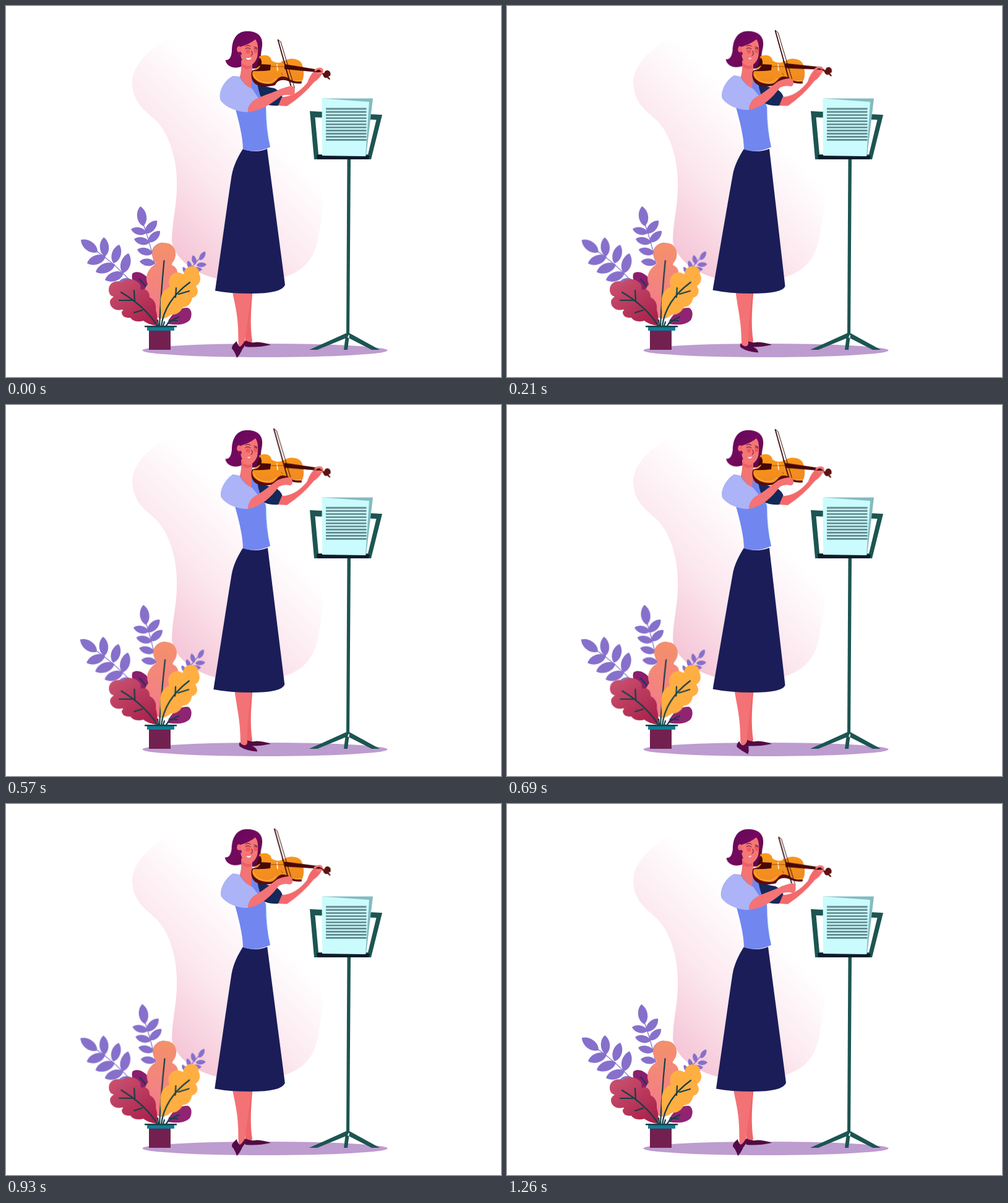
Animation, 800 px wide and 600 px high, one loop 1.29 s. Source, as an HTML page:

```html
<!DOCTYPE html>
<html lang="en">
<head>
<meta charset="utf-8">
<title>Violinist</title>
<style>
html, body { margin: 0; width: 100%; height: 100%; overflow: hidden; background: #fff; }
svg { display: block; width: 800px; height: 600px; }
svg * { animation-duration: 1290ms; animation-iteration-count: infinite; animation-timing-function: ease-in-out; }

/* plant */
.sway { animation-name: sway; transform-origin: 246px 517px; }
@keyframes sway { 50% { transform: rotate(var(--a)); } }
.vein { fill: none; stroke: #143f47; stroke-width: 2.2; stroke-linecap: round; }
.twig { fill: none; stroke: #8670cb; stroke-width: 1.3; }
.leaves { fill: #8670cb; }

/* right arm and bow */
.bow { animation-name: bow; }
@keyframes bow {
  16.3%, 32.6% { transform: translate(-6px, -15px); }
  44.2% { transform: translate(-6.7px, -16.3px); }
  62.8% { transform: translate(-5.5px, -14px); }
  81.4% { transform: translate(-6px, -15px); animation-timing-function: cubic-bezier(.4, .1, .7, .9); }
}
.arm { animation-name: arm; }
@keyframes arm {
  0%, 100% { d: path("M391 171.500C390 160 400 152 409 148C423 142 435 139 444 134Q452 131 461 129Q467 130 467 137Q467 144 462 145Q453 142 444 146C430 157 414 169 391 171.500Z"); }
  16.3%, 81.4% { d: path("M391 168C391 158 397 150 405 146C417 139 427 130 438 122Q446 118 456 117Q463 117 463 124Q463 130 458 130Q449 128 441 132C430 147 414 164 391 168Z"); animation-timing-function: cubic-bezier(.4, .1, .7, .9); }
}
.sleeve { animation-name: sleeve; }
@keyframes sleeve {
  0%, 100% { d: path("M367 113C350 121 342 143 347 153C356 165 376 172 391 171.500C390 160 400 152 408 149L398 134Q385 129 377 114Z"); }
  16.3%, 81.4% { d: path("M367 112C352 121 344 141 348 150C357 162 376 169 391 168C391 158 397 150 407 145L398 134Q385 129 377 114Z"); animation-timing-function: cubic-bezier(.4, .1, .7, .9); }
}

/* violin neck with the left hand */
.neck { animation-name: neck; transform-origin: 425px 97px; }
.hand { animation-name: hand; transform-origin: 443px 160px; }
@keyframes neck {
  16.3%, 81.4% { transform: rotate(-3.200deg); }
  32.6% { transform: rotate(-1.500deg); }
  44.2% { transform: rotate(-1deg); }
  62.8%, 97.7% { transform: rotate(-.6deg); }
}
@keyframes hand {
  16.3%, 81.4% { transform: rotate(-1.800deg); }
  32.6%, 44.2%, 97.7% { transform: rotate(-.4deg); }
  62.8% { transform: rotate(-.2deg); }
}

/* head */
.hair { animation-name: hair; transform-origin: 392px 60px; }
@keyframes hair {
  16.3%, 81.4% { transform: rotate(2deg); }
  32.6%, 44.2%, 97.7% { transform: rotate(.4deg); }
  62.8% { transform: rotate(1.200deg); }
}
.mouth { animation-name: mouth; transform-origin: 393px 84px; }
@keyframes mouth {
  0%, 62.8%, 100% { transform: none; }
  16.3%, 44.2%, 97.7% { transform: scale(.6, .65); }
  81.4% { transform: scale(.75, .8); }
}

/* skirt and tapping foot */
.skirt { animation-name: skirt; }
@keyframes skirt {
  0%, 33.300%, 77.500%, 100% { d: path("M383 231Q403 239 422 231L451 451Q446 465 396 465Q362 465 338 460.500C347 400 357 325 364.500 275C368 256 376 242 383 231Z"); }
  16.7%, 55.800% { d: path("M383 231Q403 239 424 231L449.500 453Q446 465 396 465Q360 465 332.500 459.500C343 400 355 328 364.500 275C367 258 376 242 383 231Z"); }
}
.leg { animation-name: leg; }
@keyframes leg {
  0%, 62.8%, 100% { d: path("M366 462C370 485 376 500 375.500 543Q376 553 381 552L386 543C388 520 394 490 397 462Z"); }
  16.3%, 44.2% { d: path("M369.500 462C373 490 379 510 379 546Q384 553 389 551L390 546C389 520 393 490 397 462Z"); }
}
.shoe { animation-name: shoe; }
@keyframes shoe {
  0%, 62.8%, 100% { d: path("M373 542Q364 549 365 554Q370 559 373 569Q377 566 382 555Q389 547 386 541Q382 549 378 551Q374 549 373 542Z"); }
  16.3%, 44.2% { d: path("M378 545Q375 550 379 553Q388 559 406 560.500Q406 555 399 552Q393 549 390 547Q388 551 384 550Q380 549 378 545Z"); }
}
</style>
</head>
<body>
<svg viewBox="0 0 800 600">
  <defs>
    <linearGradient id="glow" gradientUnits="userSpaceOnUse" x1="276" y1="402" x2="448" y2="230">
      <stop stop-color="#f5c6d7"/><stop offset=".5" stop-color="#fce8ef"/><stop offset="1" stop-color="#fff"/>
    </linearGradient>
    <linearGradient id="peach" x2="0" y2="1"><stop stop-color="#f4916a"/><stop offset="1" stop-color="#f27a8e"/></linearGradient>
    <linearGradient id="wine" x2=".8" y2="1"><stop stop-color="#cc5471"/><stop offset="1" stop-color="#a9214b"/></linearGradient>
    <linearGradient id="plum" x2="1" y2="1"><stop stop-color="#5d0758"/><stop offset=".5" stop-color="#75095f"/><stop offset="1" stop-color="#560641"/></linearGradient>
    <linearGradient id="wood" x2=".2" y2="1"><stop stop-color="#fa9a1b"/><stop offset="1" stop-color="#f18a20"/></linearGradient>
  </defs>

  <path fill="url(#glow)" d="M272 47C235 66 203 94 204 126C206 158 226 170 242 185C264 207 277 248 276 292C276 325 268 350 268 380C271 402 292 425 330 438C366 449 421 449 454 437C490 424 502 398 506 366C509 345 514 325 512 310L490 150L400 60Z"/>
  <ellipse cx="418.500" cy="557" rx="198" ry="11" fill="#bd9ccf"/>

  <g fill="#1c5552">
    <path fill-rule="evenodd" d="M491 170L608 176L590 248H498ZM499.500 180L505 240H585L598.500 184Z"/>
    <path d="M551.500 247H557L555 532H550Z"/>
    <path d="M550 529L490 556H503L552 536ZM549 532L546 556H552L555 532ZM555 529L604 556H591L552 536Z"/>
    <path fill="#0d1c2c" d="M502 241L588 242L586 248H503Z"/>
  </g>
  <path fill="#82bbc0" d="M511 149.500H593L582 242H560Z"/>
  <path fill="#cbfcfd" d="M510.500 149.500L587 155L581 243L511 242Z"/>
  <path id="score" stroke="#688f94" stroke-width="2.900"/>

  <g>
    <g class="sway" style="--a:-.5deg">
      <path class="twig" d="M140 392Q174 414 206 450"/>
      <g class="leaves" data-leaves="121,378,148,398 158,374,160,405 131,416,161,405 183,386,174,416 145,430,176,418 198,400,189,432 160,443,190,432 180,450,202,442"></g>
    </g>
    <g class="sway" style="--a:1.500deg">
      <path class="twig" d="M221 350Q232 380 241 420"/>
      <g class="leaves" data-leaves="217,324,222,356 244,347,225,368 202,361,227,367 249,364,230,382 207,377,232,383 212,394,237,400 255,383,236,401 216,413,241,416"></g>
    </g>
    <g class="sway" style="--a:-1.200deg">
      <path class="twig" d="M318 403Q300 420 285 445"/>
      <g class="leaves" data-leaves="322,397,313,411 302,403,306,418 324,418,308,419 294,412,299,426 317,426,301,426 286,422,292,433"></g>
    </g>
    <path fill="#8b1e6e" d="M205 432C213 427 224 433 230 441L236 462L222 462C208 456 200 440 205 432Z"/>
    <path class="vein" d="M216 442Q223 449 230 460"/>
    <path fill="#8f2472" d="M260 514C268 496 280 487 294 488C301 491 301 501 297 508C288 517 274 516 260 514Z"/>
    <path class="vein" d="M279 503Q264 509 258 518M264 508L277 509"/>
    <g class="sway" style="--a:.9deg">
      <path fill="url(#peach)" d="M255 383C271 382 277 397 273 408C271 414 267 416 268 419C277 422 280 433 274 442C281 453 278 466 273 474C270 490 261 500 250 506C238 502 232 494 230 480C221 472 221 459 229 450C223 436 231 424 241 418C244 416 236 410 236 400C237 389 245 383 255 383Z"/>
      <path class="vein" d="M255.500 412Q250 470 248 518"/>
    </g>
    <g class="sway" style="--a:.4deg">
      <path fill="url(#wine)" d="M166 459C166 448 177 442 187 447C193 439 210 440 217 451C218 454 217 457 218 459C226 456 232 461 232 471C240 475 243 482 242 491C245 502 245 510 244 517C235 516 227 513 222 509C212 512 204 509 201 504C193 505 187 502 187 495C188 492 191 492 188 491C176 494 168 487 168 479C168 474 172 472 174 470C169 469 166 465 166 459Z"/>
      <path class="vein" d="M186 463Q225 486 245 518M183 476H203M207 460L208 478M207 496L220 492"/>
    </g>
    <g class="sway" style="--a:-.9deg">
      <path fill="#ffae42" d="M300 421C308 421 313 426 312 433C316 441 314 449 307 453C313 462 309 470 301 472C299 483 292 487 286 487C282 496 274 500 267 499C261 504 255 507 250 504C252 496 249 490 250 480C249 468 254 458 265 454C260 444 266 431 278 431C282 431 285 433 287 434C288 426 293 421 300 421Z"/>
      <path class="vein" d="M297 447Q256 477 251 518M275 456L274 471M279 466L296 461"/>
    </g>
    <path class="vein" stroke-width="1.500" d="M246 517L245 508M254 517L256 511"/>
    <path fill="#722050" d="M231 525H266V556H231Z"/>
    <path fill="#0f7f96" d="M228 519H272V525H228Z"/>
    <path fill="#15434a" d="M224 517H276V519.500H224Z"/>
  </g>

  <path fill="#ee666a" d="M382 462H398.500C396 490 394 515 398 542Q394 548 387 544Z"/>
  <path fill="#510b41" d="M387 541Q384 546 387 551Q405 553 428 548Q418 544 405 543.500Q396 546 387 541Z"/>
  <path class="leg" fill="#f37276" d="M366 462C370 485 376 500 375.500 543Q376 553 381 552L386 543C388 520 394 490 397 462Z"/>
  <path class="shoe" fill="#550b47" d="M373 542Q364 549 365 554Q370 559 373 569Q377 566 382 555Q389 547 386 541Q382 549 378 551Q374 549 373 542Z"/>
  <path class="skirt" fill="#1b1d58" d="M383 231Q403 239 422 231L451 451Q446 465 396 465Q362 465 338 460.500C347 400 357 325 364.500 275C368 256 376 242 383 231Z"/>

  <path fill="#c8effb" d="M417 160H421Q421 195 427 228L423 230Z"/>
  <path fill="#7286f0" d="M369 160C376 185 383 212 383 232Q404 239 427 228Q420 200 420 164L410 127L398 113L378 114Z"/>
  <path class="hair" fill="url(#plum)" d="M386 41C397 40 405 43 409 47C415 53 415 62 413 71C411 81 413 90 409 98C402 104 393 100 380 98C370 102 357 99 354.500 87.500C360 88 364 84 365 73C365 58 370 43 386 41Z"/>
  <path fill="#f27473" d="M380 88H398V113L396 134Q386 128 378 114Q381 104 380 88Z"/>
  <path fill="#e95f68" d="M380 92Q388 99 397 96V100Q387 105 380 96Z"/>
  <path fill="#f57674" d="M379 66C389 63 397 59 403 54C408 60 408 72 406 83C403 92 396 97 391 97C385 95 380 87 379 78Z"/>
  <ellipse cx="376.500" cy="70" rx="3.400" ry="5" fill="#f06b70"/>
  <circle cx="378.500" cy="77" r="2.500" fill="#79145f"/>
  <g fill="#ef5860"><circle cx="391" cy="73.500" r="3.600"/><circle cx="403.500" cy="73" r="3.200"/></g>
  <path fill="none" stroke="#4a1138" stroke-width="1" stroke-linecap="round" d="M387 69Q391 66 395 69.500M401 69Q404 67 406 70M387 65Q391 62 395 65M401 66L406 68M397 73Q400 79 396 80"/>
  <path class="mouth" fill="#fff" stroke="#c63e4e" stroke-width=".6" d="M387 83Q393 85 398 82Q396 88 391 87.500Q388 87 387 83Z"/>

  <path fill="#14285a" d="M406 124Q419 131 434 133Q445 139 447 148Q446 156 440 161Q428 162 418 158Q409 146 406 124Z"/>
  <path class="hand" fill="#f3696b" d="M440 161L446 147Q468 147 487 124Q491 110 503 101Q511 97 513 105Q508 117 498 123Q480 145 454 162Z"/>

  <path fill="#5a0c0b" d="M397 106C394 121 403 131 418 130Q428 130 435 128C438 121 445 118 455 121Q468 127 478 125L476 111L420 90Z"/>
  <path fill="url(#wood)" d="M409 82C418 77 428 80 429 88C437 94 446 92 453 87C463 83 477 86 479 96C482 104 482 117 478 122C465 124 457 114 447 114C438 114 437 125 427 126C411 127 398 119 398 109C399 103 405 101 409 97Z"/>
  <path fill="none" stroke="#ffc04a" stroke-width="1" d="M400 111Q405 124 425 124Q432 122 437 117M457 117Q468 124 477 120"/>
  <path fill="#470807" d="M398 104Q410 104 412 94L428 95L427 104Q412 106 398 105ZM410 83Q415 89 412 96L405 99Z"/>
  <path stroke="#fff0cf" stroke-width="1.800" d="M438 94L439 105"/>
  <path stroke="#8d3b10" stroke-width=".8" d="M428 98L455 98M446 88L447 92M445 108L447 112"/>
  <g class="neck">
    <path fill="#470807" d="M450 94L508 103.500L507 107.500L450 102Z"/>
    <path fill="#5d1110" d="M507 104L514 109Q515 104 520 104Q526 106 524 113L521 114L524 118Q523 120 521 118L519 116Q514 118 512 111L507 107Z"/>
  </g>
  <path class="hand" fill="none" stroke="#f57a78" stroke-width="3" stroke-linecap="round" d="M500 104Q506 99 511 103M504 109L511 108"/>

  <path class="sleeve" fill="#acb3f6" d="M367 113C350 121 342 143 347 153C356 165 376 172 391 171.500C390 160 400 152 408 149L398 134Q385 129 377 114Z"/>
  <g class="bow" fill="none" stroke="#3c0a0b">
    <path stroke-width="1.800" d="M439.500 54.500L461.500 133"/>
    <path stroke-width="1" d="M439 54L444 58L466.500 133"/>
  </g>
  <path class="arm" fill="#f47375" d="M391 171.500C390 160 400 152 409 148C423 142 435 139 444 134Q452 131 461 129Q467 130 467 137Q467 144 462 145Q453 142 444 146C430 157 414 169 391 171.500Z"/>
</svg>
<script>
// A pointed leaf from tip (x, y) to stalk (u, v)
const leaf = s => {
  const [x, y, u, v] = s.split(',').map(Number);
  const dx = u - x, dy = v - y, k = .31;
  const at = (t, n) => `${x + dx * t - dy * n} ${y + dy * t + dx * n}`;
  return `M${x} ${y}C${at(.25, k)} ${at(.8, k)} ${u} ${v}C${at(.8, -k)} ${at(.25, -k)} ${x} ${y}Z`;
};
for (const g of document.querySelectorAll('[data-leaves]')) {
  const p = document.createElementNS('http://www.w3.org/2000/svg', 'path');
  p.setAttribute('d', g.dataset.leaves.split(' ').map(leaf).join(''));
  g.append(p);
}
const lines = Array.from({ length: 11 }, (_, i) => `M517 ${166.3 + i * 5.02}H582.5`);
document.getElementById('score').setAttribute('d', lines.join(''));
</script>
</body>
</html>
```
